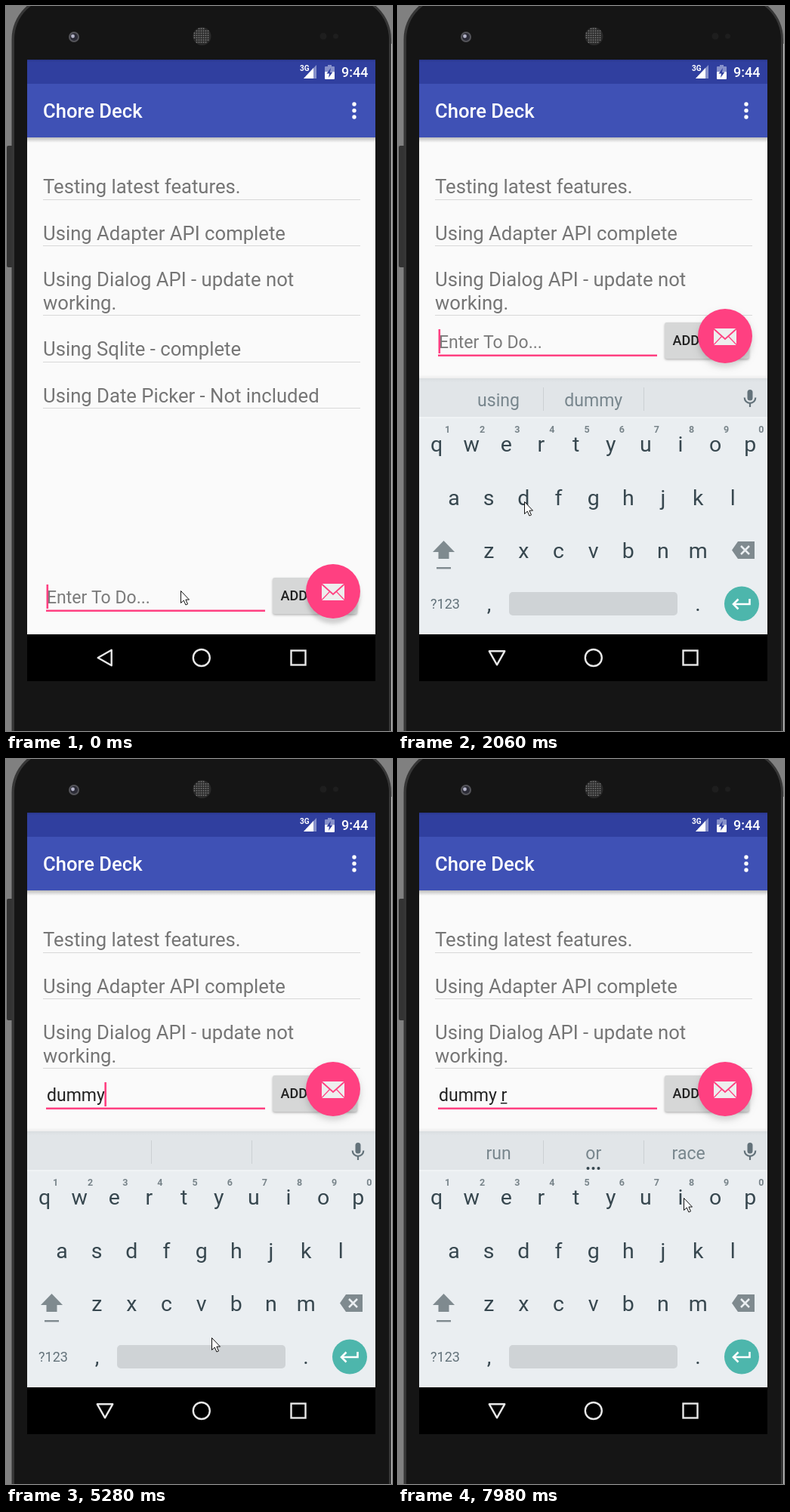
Write an HTML page with a canvas that moves like this. It is 511 px wide and 960 px high and loops after 8 s.

```html
<!DOCTYPE html>
<html lang="en">
<head>
<meta charset="utf-8">
<title>To-do screen</title>
<style>
  html, body { margin: 0; width: 100%; height: 100%; overflow: hidden; background: #808080; }
  canvas { display: block; width: 511px; height: 960px; }
</style>
</head>
<body>
<canvas id="stage"></canvas>
<script>
const W = 511, H = 960, LOOP = 8000, TICK = 131, BLINK = 500;
const PINK = '#ff4081', INK = '#212121', KEY_INK = '#37474f', KEY_GREY = '#7f8a8f';
const KEY_STEP = 46.15, ROW_STEP = 70.5;
const stage = document.getElementById('stage');
const ctx = stage.getContext('2d');
const ratio = window.devicePixelRatio || 1;
stage.width = W * ratio;
stage.height = H * ratio;

function box(x, y, w, h, color) {
  ctx.fillStyle = color;
  ctx.fillRect(x, y, w, h);
}

function round(x, y, w, h, r, color) {
  ctx.fillStyle = color;
  ctx.beginPath();
  ctx.roundRect(x, y, w, h, r);
  ctx.fill();
}

function disc(x, y, r, color) {
  ctx.fillStyle = color;
  ctx.beginPath();
  ctx.arc(x, y, r, 0, Math.PI * 2);
  ctx.fill();
}

function trace(points, closed) {
  ctx.beginPath();
  points.forEach(([x, y]) => ctx.lineTo(x, y));
  if (closed) ctx.closePath();
}

function poly(points, color) {
  trace(points, true);
  ctx.fillStyle = color;
  ctx.fill();
}

function stroke(points, color, width, closed) {
  trace(points, closed);
  ctx.strokeStyle = color;
  ctx.lineWidth = width;
  ctx.stroke();
}

function arc(x, y, r, from, to, color, width) {
  ctx.strokeStyle = color;
  ctx.lineWidth = width;
  ctx.beginPath();
  ctx.arc(x, y, r, from, to);
  ctx.stroke();
}

function font(size, weight = 400) {
  ctx.font = `${weight} ${size}px Roboto, sans-serif`;
}

function text(str, x, y, size, color, align = 'left', weight = 400) {
  font(size, weight);
  ctx.textAlign = align;
  ctx.fillStyle = color;
  ctx.fillText(str, x, y);
}

function fade(x, y, w, h, from, to) {
  const g = ctx.createLinearGradient(0, y, 0, y + h);
  g.addColorStop(0, from);
  g.addColorStop(1, to);
  box(x, y, w, h, g);
}

function withShadow(blur, dy, alpha, draw) {
  ctx.save();
  ctx.shadowColor = `rgba(0,0,0,${alpha})`;
  ctx.shadowBlur = blur * ratio;
  ctx.shadowOffsetY = dy * ratio;
  draw();
  ctx.restore();
}

function drawPhone() {
  box(0, 0, W, H, '#808080');
  box(510, 50, 1, 910, '#c8c8c8');
  round(1, 185, 9, 161, 2, '#333333');
  round(7.5, -14, 502.5, 1100, 58, '#363636');
  round(11, -11, 496, 1100, 55, '#151515');

  disc(90, 41, 7, '#55555a');
  disc(90, 41, 5, '#2b2b36');
  disc(88.5, 40, 2.4, '#b4b4c8');

  disc(259.5, 40, 12, '#2a2a2a');
  for (let y = -10; y <= 10; y += 3) {
    for (let x = -10; x <= 10; x += 3) {
      if (x * x + y * y < 125) disc(259.5 + x, 40 + y, 1, '#707070');
    }
  }
  disc(420, 40, 4.5, '#1e1e1e');
  disc(436.5, 40, 3.5, '#1e1e1e');
}

function drawBars() {
  box(28, 71, 461, 32, '#303f9f');
  fade(28, 71, 461, 3, '#29368b', '#303f9f');
  text('3G', 389, 86, 10, '#ffffff', 'left', 700);
  poly([[411, 78], [411, 96], [394, 96]], '#8791ca');
  poly([[407, 82], [407, 96], [394, 96]], '#ffffff');
  box(426, 78, 5, 3, '#8791ca');
  round(422, 80, 13, 8, 1, '#8791ca');
  round(422, 87, 13, 10, 1, '#ffffff');
  poly([[430, 82], [424.5, 89.5], [428, 89.5], [427, 95], [432.5, 87.5], [429, 87.5]], '#303f9f');
  text('9:44', 444, 94, 18, '#ffffff', 'left', 500);

  box(28, 103, 461, 71, '#3f51b5');
  text('Chore Deck', 49, 148, 25.6, '#ffffff', 'left', 500);
  for (let i = -1; i <= 1; i++) disc(461, 138.5 + i * 8.5, 2.7, '#ffffff');
}

const ITEMS = [
  ['Testing latest features.'],
  ['Using Adapter API complete'],
  ['Using Dialog API - update not', 'working.'],
  ['Using Sqlite - complete'],
  ['Using Date Picker - Not included']
];

function drawList(raised) {
  box(28, 174, 461, 658, '#fafafa');
  fade(28, 174, 461, 7, '#bdbdbd', '#fafafa');
  let y = 248;
  for (const lines of ITEMS.slice(0, raised ? 3 : 5)) {
    lines.forEach((line, i) => text(line, 49, y + i * 30.5, 25.68, '#757575'));
    y += 61.5 + (lines.length - 1) * 30.5;
    box(49, Math.round(y - 54), 420, 1, '#d8d8d8');
  }
}

function drawInput(s) {
  ctx.save();
  ctx.translate(0, s.raised ? -338 : 0);
  text(s.text || 'Enter To Do...', 54, 791, 23, s.text ? INK : '#7b7b7b');
  const end = 54 + ctx.measureText(s.text).width;
  if (s.text.endsWith('r')) box(end - 8.5, 793, 8.5, 1.5, INK);
  box(53, 799.5, 290, 2.5, PINK);
  if (s.caret) box(end - 0.5, 766, 2.6, 32, PINK);

  withShadow(3, 1.5, 0.28, () => round(353, 757, 112, 48, 3, '#d6d7d7'));
  text('ADD', 363.5, 787, 18, INK, 'left', 500);
  const [blur, drop] = s.raised ? [8, 5] : [5, 7];
  withShadow(blur, drop, 0.17, () => disc(433, 775, 36, PINK));

  box(418, 765, 30, 22, '#eeeeee');
  stroke([[418, 765.5], [433, 779], [448, 765.5]], PINK, 1.8);
  for (const side of [-1, 1]) {
    stroke([[433 + side * 15, 786.5], [433 + side * 4.5, 775.5]], PINK, 1.2);
  }
  ctx.restore();
}

function drawKeys() {
  ['qwertyuiop', 'asdfghjkl', 'zxcvbnm'].forEach((keys, row) => {
    const x = 51 + KEY_STEP * row * (row + 1) / 4;
    [...keys].forEach((key, i) => {
      text(key, x + i * KEY_STEP, 590 + row * ROW_STEP, 28.5, KEY_INK, 'center');
    });
  });
  for (let i = 0; i < 10; i++) {
    text((i + 1) % 10, 65.5 + i * KEY_STEP, 565, 12.5, '#78848a', 'center', 700);
  }

  poly([[60.5, 708], [75, 723], [46, 723]], KEY_GREY);
  box(53.5, 722, 14, 10, KEY_GREY);
  box(51, 743, 19, 2.4, KEY_GREY);

  poly([[442, 720.5], [450, 709], [472, 709], [472, 732], [450, 732]], KEY_GREY);
  for (const d of [-5.5, 5.5]) {
    stroke([[459.5 - d, 715], [459.5 + d, 726]], '#eaeef1', 2.5);
  }

  text('?123', 62.5, 798, 18, '#63727a', 'center');
  text(',', 120.5, 801, 28.5, KEY_INK, 'center');
  text('.', 397, 801, 28.5, KEY_INK, 'center');

  disc(455, 791.5, 23, '#4db6ac');
  stroke([[465.5, 785], [465.5, 792], [445, 792]], '#ffffff', 2.6);
  stroke([[450.5, 785.5], [444, 792], [450.5, 798.5]], '#ffffff', 2.6);
}

function drawMic() {
  const color = '#63727a';
  round(462.5, 508, 7, 14.5, 3.5, color);
  arc(466, 518.5, 7.3, 0, Math.PI, color, 2.2);
  box(464.9, 526, 2.2, 5, color);
}

function drawKeyboard(s) {
  if (s.slide <= 0) return;
  ctx.save();
  ctx.beginPath();
  ctx.rect(28, 488, 461, 344);
  ctx.clip();
  ctx.translate(0, 342 * (1 - s.slide));
  fade(28, 488, 461, 5, 'rgba(0,0,0,0)', 'rgba(0,0,0,.05)');
  box(28, 493, 461, 52, '#e1e5e8');
  fade(28, 493, 461, 5, '#d9dde0', '#e1e5e8');
  box(28, 545, 461, 287, '#eaeef1');
  box(28, 544, 461, 2, '#f0f3f5');

  if (s.pressed === 'word') box(192, 493, 133, 52, '#cfd5d9');
  for (const x of [192, 325]) box(x, 505, 1, 31, '#cbd0d3');
  s.words.forEach((w, i) => text(w, 133 + i * 125.8, 530, 23, '#78868d', 'center'));
  if (s.words.length > 2) {
    for (let i = -1; i <= 1; i++) disc(258.5 + i * 7, 542, 2, KEY_INK);
  }
  drawMic();

  if (s.pressed === 'r') round(168, 548, 44, 65, 4, '#d5dade');
  round(147, 776, 223, 31, 5, s.pressed === 'space' ? '#b9bfc3' : '#cfd3d6');
  drawKeys();
  ctx.restore();
}

function drawNav(raised) {
  const color = '#e8e8e8';
  box(28, 832, 461, 62, '#000000');
  ctx.save();
  ctx.translate(131, 863);
  if (raised) ctx.rotate(-Math.PI / 2);
  ctx.lineJoin = 'round';
  stroke([[-9.3, 0], [8.7, -10.2], [8.7, 10.2]], color, 2.4, true);
  ctx.restore();
  arc(258.8, 863, 11, 0, Math.PI * 2, color, 2.4);
  ctx.strokeRect(377.5, 853.5, 19, 19);
}

// Pointer legs: start, end, x, y of the stop
const LEGS = [
  [1441, 1965, 167, 656],
  [2358, 3275, 233, 560],
  [3406, 3668, 263, 519],
  [4716, 5240, 272, 766],
  [5240, 5764, 272, 794],
  [6157, 6943, 188, 589],
  [7336, 7860, 378, 581]
];

function pointerAt(t) {
  let x = 231, y = 774;
  for (const [start, end, toX, toY] of LEGS) {
    const p = Math.min(1, Math.max(0, (t - start) / (end - start)));
    const ease = p * p * (3 - 2 * p);
    x += (toX - x) * ease;
    y += (toY - y) * ease;
  }
  return [Math.round(x), Math.round(y)];
}

function drawPointer([x, y]) {
  ctx.save();
  ctx.translate(x + 0.5, y + 0.5);
  const arrow = [[0, 0], [0, 16], [3.8, 12.6], [6.4, 18.5], [9, 17.4], [6.4, 11.6], [11, 11.6]];
  poly(arrow, '#ffffff');
  stroke(arrow, '#111111', 1, true);
  ctx.restore();
}

// Each edit restarts the caret's blinking
const EDITS = [
  { at: 0, text: '', words: ['using', 'dummy'] },
  { at: 870, text: '', words: ['using', 'dummy'] },
  { at: 4270, text: 'dummy', words: [] },
  { at: 6150, text: 'dummy ', words: [] },
  { at: 7440, text: 'dummy r', words: ['run', 'or', 'race'] }
];

const PRESSES = [
  { key: 'word', from: 4180, to: 4440 },
  { key: 'space', from: 6040, to: 6150 },
  { key: 'r', from: 7310, to: 7440 }
];

function stateAt(t) {
  const tick = Math.min(LOOP, Math.floor((t + 20) / TICK) * TICK);
  const left = 1 - Math.min(1, Math.max(0, (tick - 1180) / 390));
  const edit = EDITS.findLast(e => e.at <= t);
  return {
    raised: t >= 1020,
    slide: 1 - left * left,
    text: edit.text,
    words: edit.words,
    caret: Math.floor((t - edit.at) / BLINK) % 2 === 0,
    pressed: PRESSES.find(p => t >= p.from && t < p.to)?.key,
    pointer: pointerAt(tick)
  };
}

function render(t) {
  const s = stateAt(t);
  ctx.setTransform(ratio, 0, 0, ratio, 0, 0);
  drawPhone();
  drawList(s.raised);
  drawBars();
  drawInput(s);
  drawKeyboard(s);
  drawNav(s.raised);
  drawPointer(s.pointer);
}

const start = performance.now();
function frame() {
  render((performance.now() - start) % LOOP);
  requestAnimationFrame(frame);
}
frame();
</script>
</body>
</html>
```
